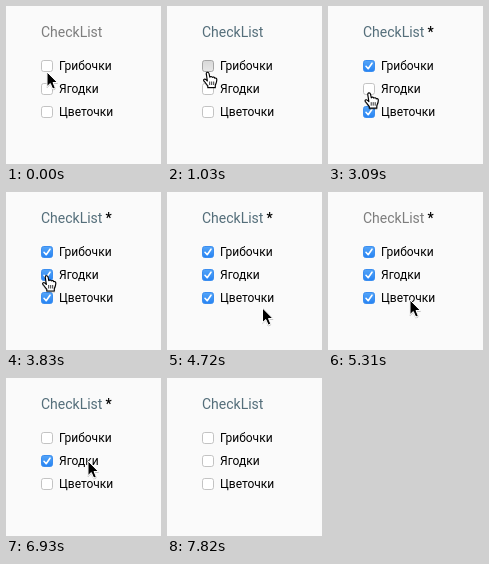
An HTML page for the animation above (8110 ms loop, 155x158 px).

```html
<!DOCTYPE html>
<html lang="ru">
<head>
<meta charset="utf-8">
<title>CheckList</title>
<style>
  html, body { margin: 0; width: 100%; height: 100%; overflow: hidden; background: #fafafa; }
  svg { display: block; width: 155px; height: 158px; font-family: Roboto, "Open Sans", sans-serif; }
</style>
</head>
<body>
<svg viewBox="0 0 155 158">
  <defs>
    <linearGradient id="blue" x2="0" y2="1">
      <stop offset="0" stop-color="#55a5f8"/>
      <stop offset="1" stop-color="#2683f3"/>
    </linearGradient>
    <linearGradient id="pressed" x2="0" y2="1">
      <stop offset="0" stop-color="#d8d8d8"/>
      <stop offset="1" stop-color="#e8e8e8"/>
    </linearGradient>
    <filter id="shadow" x="-50%" y="-50%" width="200%" height="200%">
      <feDropShadow dx="0" dy=".7" stdDeviation=".6" flood-opacity=".3"/>
    </filter>
  </defs>
  <rect width="155" height="158" fill="#fafafa"/>
  <text id="title" x="35" y="31" font-size="14">CheckList</text>
  <text id="star" x="99.5" y="31" font-size="14" font-weight="500">*</text>
  <g id="list"></g>
  <g id="arrow" filter="url(#shadow)">
    <path d="M0 0V14.6L3.3 11.5 5.7 17 8.3 15.9 6 10.5H10.4Z" fill="#000" stroke="#fff" stroke-linejoin="round"/>
  </g>
  <g id="hand" filter="url(#shadow)">
    <path d="M-1.7 1.8C-1.9-.2.6-.4 1 1.5L1.8 5.2C2.3 4.2 4 4.2 4.3 5.5 5 4.7 6.5 5 6.7 6.2 7.6 5.6 8.9 6.2 8.8 7.7 8.8 10 8.1 11.3 7.3 13V15.5H-.2V13.7C-1.6 12.4-2.5 10.5-3.9 9.2-5.4 7.6-3.4 6.5-2 7.7L-.6 9Z" fill="#fff" stroke="#000" stroke-width="1.1" stroke-linejoin="round"/>
    <path d="M1.7 9.5V13M3.7 9.5V13M5.7 9.5V13" stroke="#000" stroke-width=".8"/>
  </g>
</svg>
<script>
const LOOP = 8110, TICK = 147.45;
const GREY = '#7d7d7d', SLATE = '#546e7a';
const byId = id => document.getElementById(id);

// Ticks from press to release of each pointer action.
const rows = [
  { label: 'Грибочки', on: 8, off: 43, press: 6 },
  { label: 'Ягодки', on: 25, off: 49, press: 24 },
  { label: 'Цветочки', on: 18, off: 37, press: 17 }
];
// Ticks at which pressing a label takes the focus away.
const blurred = [36, 42, 48];

// Pointer stops: tick, x, y.
const stops = [
  [0, 41, 66], [1, 42, 55], [2, 42, 60], [3, 42, 65], [5, 41, 66],
  [9, 41, 66], [12, 41, 86], [15, 40.5, 106], [19, 40.5, 106],
  [22, 42, 77], [24, 41, 83], [26, 41, 83.5], [27, 47, 84],
  [30, 124, 143], [32, 95.5, 116], [35, 84, 109], [36, 82, 108],
  [38, 82, 108], [39, 84, 88], [40, 82, 59.5], [43, 82, 59.5],
  [47, 82, 83], [49, 82, 83], [50, 74, 97], [52, 118, 149], [53, 150, 190]
];

function pointerAt(tick) {
  const next = stops.findIndex(s => s[0] > tick);
  if (next < 0) return stops.at(-1).slice(1);
  const [t0, x0, y0] = stops[next - 1], [t1, x1, y1] = stops[next];
  const k = (tick - t0) / (t1 - t0);
  return [x0 + (x1 - x0) * k, y0 + (y1 - y0) * k];
}

byId('list').innerHTML = rows.map((row, i) => `
  <g transform="translate(35 ${54 + 23 * i})">
    <rect x=".5" y=".5" width="11" height="11" rx="2.2"/>
    <path d="M3 6.3 5.2 8.7 9 3.2" fill="none" stroke="#fff" stroke-width="1.6" stroke-linecap="round" stroke-linejoin="round"/>
    <text x="18" y="10" font-size="12">${row.label}</text>
  </g>`).join('');
rows.forEach((row, i) => {
  const group = byId('list').children[i];
  row.box = group.querySelector('rect');
  row.mark = group.querySelector('path');
});

const show = (el, visible) => el.setAttribute('visibility', visible ? 'visible' : 'hidden');

function draw(time) {
  const tick = Math.min(54, Math.floor((time % LOOP + 9) / TICK));

  byId('title').setAttribute('fill', tick < 6 || blurred.includes(tick) ? GREY : SLATE);
  show(byId('star'), tick >= 9 && tick < 50);

  for (const { box, mark, on, off, press } of rows) {
    const checked = tick >= on && tick < off;
    const held = tick >= press && tick < on;
    box.setAttribute('fill', checked ? 'url(#blue)' : held ? 'url(#pressed)' : '#fff');
    box.setAttribute('stroke', checked ? '#3b8ef0' : held ? '#a5a5a5' : '#c3c3c3');
    show(mark, checked);
  }

  const [x, y] = pointerAt(tick);
  const isHand = tick >= 1 && tick < 27;
  for (const id of ['arrow', 'hand']) {
    show(byId(id), tick < 53 && (id === 'hand') === isHand);
    byId(id).setAttribute('transform', `translate(${x} ${y})`);
  }
}

const start = performance.now();
function loop() {
  draw(performance.now() - start);
  requestAnimationFrame(loop);
}
loop();
</script>
</body>
</html>
```
